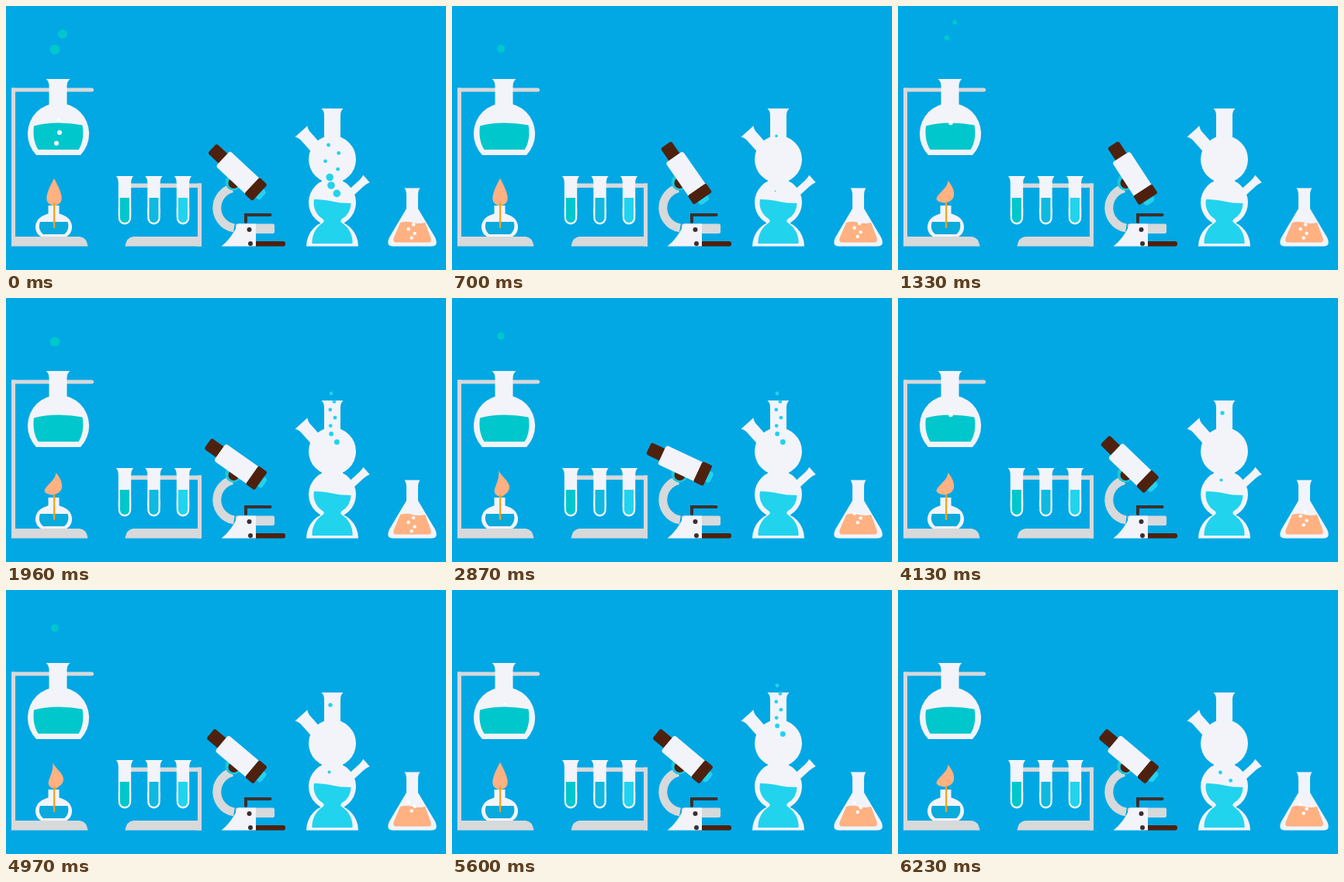
These frames come from a looping animation (567 by 340 pixels, 6.3 s). An HTML page with a canvas:

```html
<!DOCTYPE html>
<html lang="en">
<head>
<meta charset="utf-8">
<title>Laboratory</title>
<style>
  html, body { margin: 0; width: 100%; height: 100%; overflow: hidden; background: #02a8e4; }
  canvas { display: block; }
</style>
</head>
<body>
<canvas id="stage" width="567" height="340"></canvas>
<script>
const ctx = document.getElementById('stage').getContext('2d');
const LOOP = 6300, STEP = 70;
const SKY = '#02a8e4', GLASS = '#f2f4fa', GREY = '#d7d9db', BROWN = '#4e210f', DARK = '#3b302e',
      GREEN = '#00c7cc', CYAN = '#22d3ee', PEACH = '#ffb182', WHITE = '#fff';

const clamp = (v, lo, hi) => Math.max(lo, Math.min(hi, v));
const mix = (a, b, p) => a + (b - a) * p;
const wrap = (v, n) => ((v % n) + n) % n;

function shape(color, d) {
  ctx.fillStyle = color;
  ctx.fill(new Path2D(d));
}
function box(color, x, y, w, h, r = 0) {
  ctx.fillStyle = color;
  ctx.beginPath();
  ctx.roundRect(x, y, w, h, r);
  ctx.fill();
}
function dot(color, x, y, r) {
  ctx.fillStyle = color;
  ctx.beginPath();
  ctx.arc(x, y, r, 0, Math.PI * 2);
  ctx.fill();
}
// Open glass tube with a flared rim, its mouth centred on (x, y)
function neck(x, y, half, flare, length, degrees = 0) {
  ctx.save();
  ctx.translate(x, y);
  ctx.rotate(degrees * Math.PI / 180);
  shape(GLASS, `M${-flare} 0H${flare}Q${half} 3 ${half} 9V${length}H${-half}V9Q${-half} 3 ${-flare} 0Z`);
  ctx.restore();
}
function ease(keys, t) {
  let i = 0;
  while (i < keys.length - 2 && t >= keys[i + 1][0]) i++;
  const [t0, a] = keys[i], [t1, b] = keys[i + 1];
  const p = clamp((t - t0) / (t1 - t0), 0, 1);
  return mix(a, b, p * p * (3 - 2 * p));
}
// One bubble that rises again every period, swelling and shrinking on its way
function bubble(t, color, { x, from, to, period, delay, life, size }) {
  const p = wrap(t - delay, period) / life;
  if (p < 1) dot(color, x, mix(from, to, p), size * Math.sin(Math.PI * p));
}

function burner(t) {
  shape(GREY, 'M7 309.5V297H95Q104 298 105.5 309.5Z');
  box(GLASS, 54.5, 257, 14, 14);
  shape(GLASS, 'M45 297C35 291 36 277 46 271Q53 267 61.5 266Q70 267 77 271C87 277 88 291 78 297Z');
  shape('#0aaadd', 'M44 278H79.5C81.5 284 80 290 75 294H48C43 290 41.5 284 44 278Z');

  // Each pose: tip, right side, base, left side
  const upright = [62, 222, 70, 237, 79, 255, 62, 257, 45, 255, 54, 237];
  const left = [64, 225, 71, 231, 80, 251, 60, 253.5, 34, 250, 66, 237];
  const right = [60, 222, 64, 232, 87, 243, 64, 256, 44, 252, 63, 240];
  const sway = clamp(1.7 * Math.sin(t / 700 * Math.PI * 2), -1, 1);
  const bent = sway < 0 ? left : right;
  const p = upright.map((v, i) => mix(v, bent[i], Math.abs(sway)));
  shape(PEACH, `M${p[0]} ${p[1]}C${p.slice(2, 8).join(' ')}C${p.slice(8).join(' ')} ${p[0]} ${p[1]}Z`);
  box('#f9a01b', 61, 253, 2.2, 33, 1);
}

function flask(t) {
  bubble(t, GREEN, { x: 63, from: 78, to: 33, period: 1190, delay: -205, life: 420, size: 6.5 });
  bubble(t, GREEN, { x: 73, from: 66, to: 12, period: 1190, delay: -277, life: 500, size: 6 });
  bubble(t, GREEN, { x: 63, from: 80, to: 30, period: 2100, delay: 398, life: 600, size: 5.2 });
  bubble(t, GREEN, { x: 63, from: 78, to: 10, period: 4600, delay: 1736, life: 700, size: 7.5 });
  box(GREY, 7, 105.5, 106, 5, [1, 2.5, 2.5, 0]);
  box(GREY, 7, 105.5, 5, 203);
  neck(67, 94, 11.5, 15.5, 38);
  shape(GLASS, 'M39 192A39.6 39.6 0 1 1 96 192Z');
  shape(GREEN, 'M36 154.5Q50 150.5 68 150.5Q86 151 98.5 153.5C100.5 165 99 177 93.5 185H41.5C36 177 34.5 165 36 154.5Z');
  bubble(t, WHITE, { x: 68, from: 170, to: 142, period: 1400, delay: 980, life: 500, size: 3.5 });
  bubble(t, WHITE, { x: 65, from: 184, to: 148, period: 3300, delay: -180, life: 900, size: 5 });
  bubble(t, WHITE, { x: 69, from: 184, to: 142, period: 3300, delay: -360, life: 720, size: 3 });
}

function testTubes() {
  box(GREY, 158, 228.5, 94, 5.5, [0, 1, 0, 0]);
  box(GREY, 247, 228.5, 5, 81);
  shape(GREY, 'M153.5 309.5Q155 298 164 297H252V309.5Z');
  [GREEN, '#10b9e0', CYAN].forEach((color, i) => {
    const x = 153 + i * 37.5;
    neck(x, 219, 8.2, 11.2, 50);
    box(GLASS, x - 8.2, 260, 16.4, 21.5, [0, 0, 8.2, 8.2]);
    box(color, x - 6, 247, 12, 32, [0, 0, 6, 6]);
  });
}

function microscope(t) {
  ctx.strokeStyle = GREY;
  ctx.lineWidth = 11;
  ctx.beginPath();
  ctx.arc(298, 260, 26.2, Math.PI * .55, Math.PI * 1.42);
  ctx.stroke();
  box(GREY, 296, 280.5, 50, 12.5, 2);
  box(BROWN, 312, 303, 48, 6.5, 3);
  shape(GLASS, 'M277.5 309.5Q291 299 299 280.5H322V309.5Z');
  ctx.strokeStyle = DARK;
  ctx.lineWidth = 4;
  ctx.lineCap = 'round';
  ctx.stroke(new Path2D('M340.5 269H309V278'));
  ctx.lineCap = 'butt';
  dot(DARK, 313.5, 288, 3);
  dot(DARK, 315, 306, 3);

  dot('#1fc6dc', 293, 227, 10.5);
  dot(BROWN, 293.5, 228, 7);
  const tilt = ease([[0, 43], [900, 57], [1400, 57], [2300, 25], [3300, 25], [4130, 44], [4970, 40], [LOOP, 40]], t);
  ctx.save();
  ctx.translate(292, 227);
  ctx.rotate(tilt * Math.PI / 180);
  box(CYAN, 32, -21, 9, 15, 4);
  box(BROWN, -49, -22.5, 24, 17, 3);
  box(GLASS, -30, -27.3, 54, 27, 3.5);
  box(BROWN, 21, -28.3, 14, 28.8, 2.5);
  ctx.restore();
}

function column(t) {
  neck(420.5, 132, 10.5, 14, 42);
  neck(380.5, 161.5, 8, 10.8, 32, -42);
  neck(464.5, 222.5, 4.8, 6.3, 30, 48);
  dot(GLASS, 420.5, 197.5, 30.5);
  dot(GLASS, 420.5, 253, 30.5);
  box(GLASS, 407, 216, 27, 18);
  box(GLASS, 405, 272, 31, 14);
  shape(GLASS, 'M387 309.5A33.5 33.5 0 0 1 454 309.5Z');
  shape(CYAN, 'M397 249Q410 249 420 251.5T444.5 254A24 24 0 0 1 432.5 274.5Q430 277 432.5 279' +
    'A30 30 0 0 1 446.5 306H394.5A30 30 0 0 1 408.5 279Q411 277 408.5 274.5A24 24 0 0 1 397 249Z');

  // A zigzag cluster shoots up and narrows into the neck
  const climb = wrap(t + 455, 910) - 455;
  for (let i = 0; i < 7; i++) {
    const y = 179 + i * 10.4 - climb * .4;
    if (y < 112 || y > 247) continue;
    const spread = 9 * clamp((y - 130) / 50, .3, 1);
    dot(CYAN, 420.5 + spread * Math.sin(i * 2.6 - .6), y, i < 4 ? 2.4 : 4.8 * clamp((y - 120) / 90, .5, 1));
  }
  bubble(t, CYAN, { x: 418, from: 180, to: 125, period: 840, delay: 654, life: 200, size: 2.8 });
  bubble(t, CYAN, { x: 416.5, from: 240, to: 229, period: 840, delay: 670, life: 200, size: 2 });
}

function cone(t) {
  neck(523.5, 234.5, 7.5, 10, 30);
  shape(GLASS, 'M516 261L494 298Q489 309.5 499 309.5H548Q558 309.5 553 298L531 261Z');
  shape(PEACH, 'M508 279Q516 276.5 524 279Q532 281 540 279L547.5 299Q549 304.5 544 304.5H503Q498 304.5 499.5 299Z');
  const climb = wrap(t + 140, 665) - 140;
  for (let i = 0; i < 4; i++) {
    const y = 281.5 + i * 5.7 - climb * .045;
    if (y > 273 && y < 304) dot(WHITE, 523 + 4.5 * Math.sin(i * 4 + .5), y, 2.2);
  }
}

function draw(now) {
  const t = Math.floor(now % LOOP / STEP) * STEP;
  ctx.fillStyle = SKY;
  ctx.fillRect(0, 0, 567, 340);
  flask(t);
  burner(t);
  testTubes();
  microscope(t);
  column(t);
  cone(t);
}

let start;
function tick(now) {
  start ??= now;
  draw(now - start);
  requestAnimationFrame(tick);
}
draw(0);
requestAnimationFrame(tick);
</script>
</body>
</html>
```
